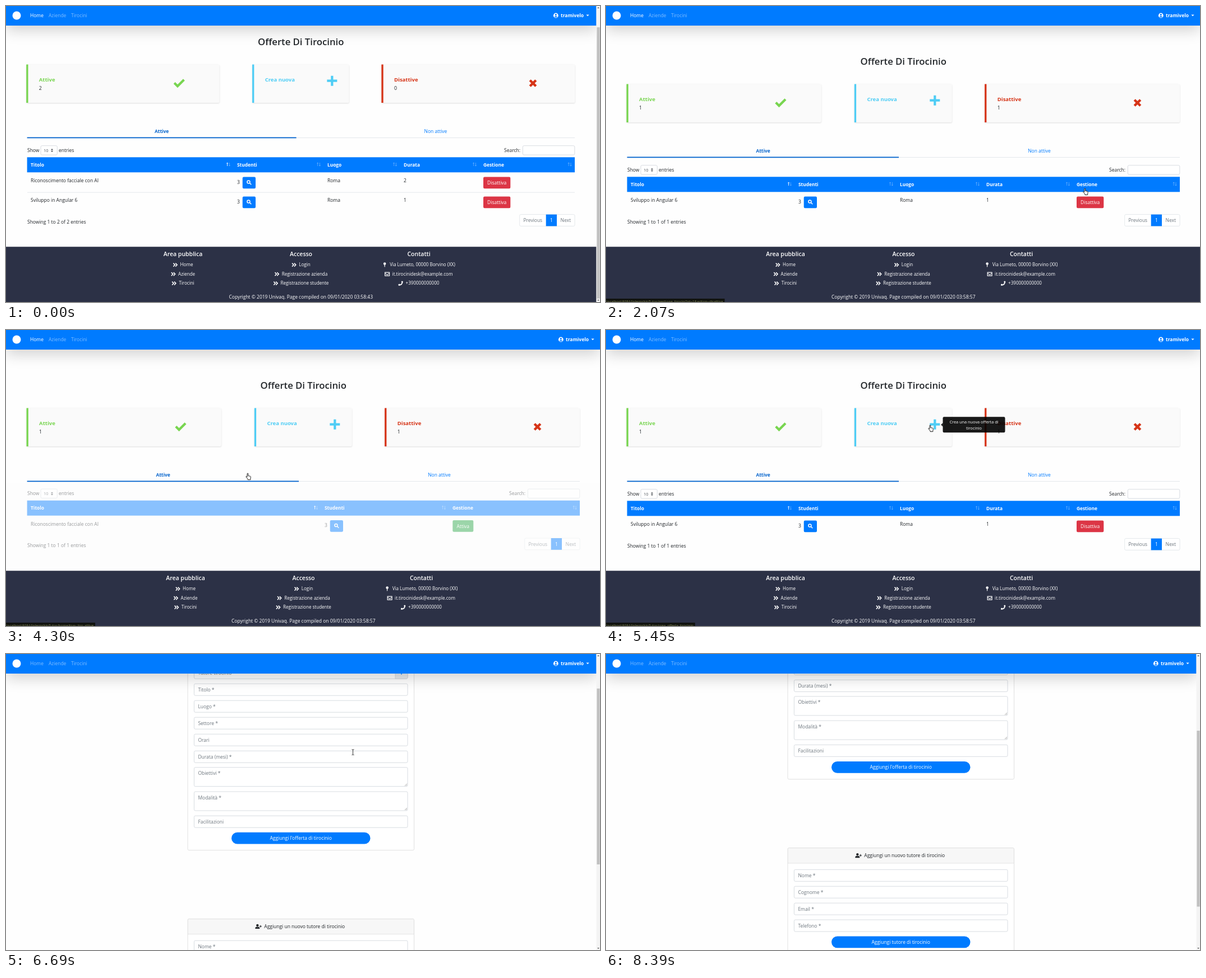
An HTML page with a canvas that plays this animation: 1059x529 px, repeating every 8640 ms.

```html
<!DOCTYPE html>
<html lang="it">
<head>
<meta charset="utf-8">
<title>Offerte di tirocinio</title>
<style>
  html, body { margin: 0; width: 100%; height: 100%; overflow: hidden; background: #fefefe; }
  canvas { display: block; }
</style>
</head>
<body>
<canvas id="stage" width="1059" height="529"></canvas>
<script>
const ctx = document.getElementById('stage').getContext('2d');
const LOOP = 8640, STAGE_W = 1059, STAGE_H = 529, NARROW_W = 1050;
const RELOAD = 1750, TO_INACTIVE = 2840, TO_ACTIVE = 4220, FADE = 150, FORM = 5620;
const BLUE = '#007bff', INK = '#212529', MUTED = '#6c757d', LINE = '#dee2e6';
const GREEN = '#78d550', CYAN = '#4fcdf5', RED = '#d63417', DANGER = '#dc3545';
const FONTS = '"Open Sans", "Noto Sans", sans-serif';
const BODY = 8.47, SMALL = 8.05;

// ---------- helpers ----------
const clamp = v => Math.max(0, Math.min(1, v));

function track(keys, t) {
  const i = keys.findIndex(k => k[0] > t);
  if (i < 0) return keys[keys.length - 1].slice(1);
  if (i === 0) return keys[0].slice(1);
  const a = keys[i - 1], b = keys[i], f = (t - a[0]) / (b[0] - a[0]);
  return a.slice(1).map((v, n) => v + (b[n + 1] - v) * f);
}

// y is the middle of the capitals
function text(str, x, y, { color = INK, size = BODY, weight = 400, align = 'left' } = {}) {
  ctx.font = `${weight} ${size}px ${FONTS}`;
  ctx.textAlign = align;
  ctx.fillStyle = color;
  ctx.fillText(str, x, y + size * 0.36);
}

function textWidth(str, size) {
  ctx.font = `400 ${size}px ${FONTS}`;
  return ctx.measureText(str).width;
}

function box(x, y, w, h, fill, stroke, radius = 2.2) {
  ctx.beginPath();
  ctx.roundRect(x, y, w, h, radius);
  if (fill) { ctx.fillStyle = fill; ctx.fill(); }
  if (stroke) { ctx.strokeStyle = stroke; ctx.lineWidth = 0.8; ctx.stroke(); }
}

function rect(x, y, w, h, fill) {
  ctx.fillStyle = fill;
  ctx.fillRect(x, y, w, h);
}

function path(d, x, y, { fill, stroke, width = 1 } = {}) {
  const p = new Path2D(d);
  ctx.save();
  ctx.translate(x, y);
  if (fill) { ctx.fillStyle = fill; ctx.fill(p); }
  if (stroke) { ctx.strokeStyle = stroke; ctx.lineWidth = width; ctx.stroke(p); }
  ctx.restore();
}

function withShadow(color, dy, blur, draw) {
  ctx.save();
  ctx.shadowColor = color;
  ctx.shadowOffsetY = dy;
  ctx.shadowBlur = blur;
  draw();
  ctx.restore();
}

const icons = {
  link: (x, y) => path('M-3.3-3L-.3 0L-3.3 3M.5-3L3.5 0L.5 3', x, y, { stroke: '#fff', width: 1.5 }),
  pin: (x, y) => path('M-2.3-2a2.3 2.3 0 1 1 4.6 0a2.3 2.3 0 0 1-1.7 2.2V3L0 4.5L-.6 3V.2A2.3 2.3 0 0 1-2.3-2z', x, y, { fill: '#fff' }),
  mail: (x, y) => path('M-4-3H4V3H-4zM-4-1.5L0 1.3L4-1.5', x, y, { stroke: '#fff', width: 1.1 }),
  phone: (x, y) => path('M2-4.2L4.2-3.6Q4 4-3.6 4.3L-4.2 2L-2 1L-1 2.1Q1.4 1 2.1-1L1-2z', x, y, { fill: '#fff' }),
};

// ---------- shared page parts ----------
function navbar(W, homeActive) {
  const edge = W < STAGE_W ? 1052.5 : STAGE_W;
  withShadow('rgba(0,0,0,.175)', 8.8, 26, () => rect(0, 0, edge, 35, BLUE));
  ctx.beginPath();
  ctx.arc(19, 17, 7.5, 0, 7);
  ctx.fillStyle = '#fff';
  ctx.fill();
  const dim = 'rgba(255,255,255,.5)';
  text('Home', 43, 17, { color: homeActive ? '#fff' : dim });
  text('Aziende', 76, 17, { color: dim });
  text('Tirocini', 116, 17, { color: dim });
  path('M-4.4 0a4.4 4.4 0 1 0 8.8 0a4.4 4.4 0 1 0-8.8 0z', W - 69.7, 17, { fill: '#fff' });
  path('M-1.6-1.3a1.6 1.6 0 1 0 3.2 0a1.6 1.6 0 1 0-3.2 0zM-2.8 2.6Q0-.4 2.8 2.6Q0 4.4-2.8 2.6z', W - 69.7, 17, { fill: BLUE });
  text('tramivelo', W - 61, 17, { color: '#fff', weight: 700 });
  path('M-2.6-1.3H2.6L0 1.4z', W - 13, 16.8, { fill: '#fff' });
}

function scrollbar(scroll, pageHeight) {
  const ratio = 517 / pageHeight;
  rect(1052.5, 0, 6.5, STAGE_H, '#f4f4f4');
  rect(1053.4, 6 + scroll * ratio, 5.2, STAGE_H * ratio, '#c1c1c1');
  path('M-1.8 1L0-1L1.8 1z', 1056, 3, { fill: '#505050' });
  path('M-1.8-1L0 1L1.8-1z', 1056, 526, { fill: '#505050' });
}

const footerColumns = [
  ['Area pubblica', -209.5, [['link', 'Home'], ['link', 'Aziende'], ['link', 'Tirocini']]],
  ['Accesso', 1, [['link', 'Login'], ['link', 'Registrazione azienda'], ['link', 'Registrazione studente']]],
  ['Contatti', 211, [['pin', 'Via Lumeto, 00000 Borvino (XX)'], ['mail', 'it.tirocinidesk@example.com'], ['phone', '+390000000000']]],
];

function footer(W, y, clock) {
  const mid = W / 2;
  rect(0, y, W < STAGE_W ? 1052.5 : W, 100, '#2c3146');
  for (const [title, dx, items] of footerColumns) {
    text(title, mid + dx, y + 13.2, { color: '#fff', size: 10.5, weight: 600, align: 'center' });
    items.forEach(([icon, label], i) => {
      const rowY = y + 32.3 + i * 16.5;
      const x = mid + dx - (13 + textWidth(label, SMALL)) / 2;
      icons[icon](x + 4, rowY);
      text(label, x + 13, rowY, { color: '#fff', size: SMALL });
    });
  }
  text(`Copyright © 2019 Univaq. Page compiled on 09/01/2020 03:58:${clock}`, mid + 0.7, y + 89.2,
    { color: '#fff', align: 'center' });
}

// ---------- offers page ----------
function offerCard(x, w, color, title, count) {
  withShadow('rgba(0,0,0,.13)', 1.1, 2.6, () => box(x, 139.5, w, 68.5, '#fafafa'));
  rect(x, 139.5, 3.3, 68.5, color);
  text(title, x + 22.6, 166.5, { color, size: 9.5, weight: 700 });
  if (count !== undefined) text(count, x + 22.6, 181.5, { size: 8.8 });
}

function sortArrows(x, y, sorted) {
  const style = a => ({ stroke: `rgba(255,255,255,${a})`, width: 0.9 });
  path('M0 3V-3M-1.3-1.5L0-3L1.3-1.5', x - 1.8, y, style(sorted ? 1 : 0.35));
  path('M0-3V3M-1.3 1.5L0 3L1.3 1.5', x + 2, y, style(0.35));
}

function button(x, y, w, label, color) {
  box(x, y, w, 20.8, color);
  text(label, x + w / 2, y + 10.7, { color: '#fff', align: 'center' });
}

// columns: [title, x]; rows: objects keyed by column title
function offersTable(W, columns, rows, hover) {
  const right = W - 36;
  text('Show', 38, 293);
  box(62, 284.7, 29.3, 16.4, '#fff', '#ced4da');
  text('10', 67, 293.2, { color: '#495057', size: 7.4 });
  path('M-2-.7L0-3L2-.7zM-2 .7L0 3L2 .7z', 82, 293, { fill: '#343a40' });
  text('entries', 94, 293);
  text('Search:', W - 133, 293, { align: 'right' });
  box(W - 128.7, 284.7, 92.5, 16.4, '#fff', '#ced4da');

  rect(37.6, 305.3, right - 37.6, 27, BLUE);
  columns.forEach(([title, x], i) => {
    text(title, x, 319, { color: '#fff', size: 8.35, weight: 700 });
    sortArrows(i + 1 < columns.length ? columns[i + 1][1] - 15.6 : W - 45, 318, i === 0);
  });

  rows.forEach((row, i) => {
    const y = 332 + i * 35;
    if (hover.row === i) rect(38, y, right - 38, 35, '#ececec');
    if (i) rect(38, y + 0.7, right - 38, 0.8, LINE);
    for (const [title, x] of columns) {
      if (title === 'Studenti') {
        text('3', x, y + 18);
        box(x + 9.7, y + 8.5, 23.3, 20.8, BLUE);
        path('M-3.4-1a2.5 2.5 0 1 0 5 0a2.5 2.5 0 1 0-5 0zM1 .8L4 3.8', x + 21.3, y + 18.5, { stroke: '#fff', width: 1.5 });
      } else if (title === 'Gestione') {
        if (row.off) button(x + 0.3, y + 8.5, 37, 'Attiva', '#28a745');
        else button(x, y + 8.5, 48.3, 'Disattiva', hover.button && i === 0 ? '#c82333' : DANGER);
      } else text(row[title], x, y + 15.3);
    }
  });

  const y = 350.8 + rows.length * 35, top = y - 13.2;
  text(`Showing 1 to ${rows.length} of ${rows.length} entries`, 38, y);
  box(W - 134.3, top, 98.3, 20.8, '#fff', LINE);
  rect(W - 87.3, top, 19.3, 20.8, BLUE);
  text('Previous', W - 110.7, y - 2.5, { color: MUTED, align: 'center' });
  text('1', W - 77.7, y - 2.5, { color: '#fff', align: 'center' });
  text('Next', W - 52.3, y - 2.5, { color: MUTED, align: 'center' });
}

const cols = (...xs) => ['Titolo', 'Studenti', 'Luogo', 'Durata', 'Gestione'].map((c, i) => [c, xs[i]]);
const FACES = { Titolo: 'Riconoscimento facciale con AI', Luogo: 'Roma', Durata: '2' };
const ANGULAR = { Titolo: 'Sviluppo in Angular 6', Luogo: 'Roma', Durata: '1' };
const tables = {
  both: [cols(44, 412, 573, 709, 851), [FACES, ANGULAR]],
  active: [cols(44, 343, 524, 678, 839), [ANGULAR]],
  inactive: [[['Titolo', 44], ['Studenti', 568], ['Gestione', 796]], [{ ...FACES, off: true }]],
};

function tabs(W, k, inactiveOpen) {
  const split = 522 * k, right = W - 36;
  rect(38, 270.2, right - 38, 0.8, LINE);
  if (inactiveOpen) rect(520, 269.3, right - 520, 1.8, '#0062cc');
  else rect(37.6, 269.5, split - 37.6, 1.8, '#0062cc');
  [['Attive', 280, !inactiveOpen], ['Non attive', 772.5, inactiveOpen]].forEach(([label, x, on]) =>
    text(label, x * k, 259, { color: on ? '#0062cc' : BLUE, weight: on ? 700 : 400, size: on ? 8.35 : BODY, align: 'center' }));
}

function tooltip(alpha) {
  if (!alpha) return;
  ctx.globalAlpha = alpha * 0.9;
  box(600.5, 155.3, 111, 28, '#000');
  path('M0 0L3.4-3.4V3.4z', 597.2, 169.3, { fill: '#000' });
  ctx.globalAlpha = alpha;
  text('Crea una nuova offerta di', 656, 164, { color: '#fff', size: 7.35, align: 'center' });
  text('tirocinio', 656, 175.5, { color: '#fff', size: 7.35, align: 'center' });
  ctx.globalAlpha = 1;
}

function offersPage(t) {
  const reloaded = t >= RELOAD;
  const W = reloaded ? STAGE_W : NARROW_W, k = W / STAGE_W, scroll = reloaded ? 0 : 35;
  const inactiveOpen = t >= TO_INACTIVE && t < TO_ACTIVE;

  ctx.save();
  ctx.translate(0, -scroll);
  text('Offerte Di Tirocinio', W / 2 + 0.7, 99, { size: 16.7, weight: 600, align: 'center' });
  offerCard(36.5 * k, 347.3 * k, GREEN, 'Attive', reloaded ? 1 : 2);
  offerCard(442.8 * k, 174 * k, CYAN, 'Crea nuova');
  offerCard(675.1 * k, 347.9 * k, RED, 'Disattive', reloaded ? 1 : 0);
  path('M-8.5 0L-2.8 5.7L8.7-5.8', 311.3 * k, 172.6, { stroke: GREEN, width: 4.2 });
  path('M-9 0H9M0-9V9', 586.3 * k, 168.7, { stroke: CYAN, width: 4.2 });
  path('M-5.3-5.3L5.3 5.3M5.3-5.3L-5.3 5.3', 947.5 * k, 173, { stroke: RED, width: 4.4 });
  tabs(W, k, inactiveOpen);

  // the old pane fades out, then the new one fades in
  const click = t >= TO_ACTIVE ? TO_ACTIVE : TO_INACTIVE;
  const phase = (t - click) / FADE;
  const alpha = phase < 0 || phase > 2 ? 1 : Math.abs(1 - phase);
  const showInactive = t >= TO_INACTIVE + FADE && t < TO_ACTIVE + FADE;
  const [columns, rows] = tables[!reloaded ? 'both' : showInactive ? 'inactive' : 'active'];
  const hover = { row: -1, button: t >= 1200 && !reloaded };
  if (t > 290 && !reloaded) {
    const y = track(cursorPath, t)[1] - 5 + scroll;
    hover.row = Math.floor((y - 332) / 35);
  }
  ctx.save();
  if (alpha < 1) ctx.translate(0, -0.6);
  offersTable(W, columns, rows, hover);
  ctx.restore();
  // veil the pane as one group, so white labels stay white
  if (alpha < 1) rect(0, 273, W, 150, `rgba(254,254,254,${1 - alpha})`);

  footer(W, 395.3 + rows.length * 35, reloaded ? 57 : 43);
  ctx.restore();
  navbar(W, true);
  if (!reloaded) scrollbar(scroll, 564);
  tooltip(clamp((t - 4900) / 150));
}

// ---------- form page ----------
function field(label, y, h = 21) {
  box(335.4, y - 10.5, 380.6, h, '#fff', '#ced4da');
  text(label, 342.4, y, { color: MUTED });
  if (h > 21) path('M0-4L-4 0M0-1.8L-1.8 0', 715, y + h - 11.5, { stroke: '#777', width: 0.6 });
}

function formCard(title, top, bottom, iconPath, titleX) {
  box(324, top, 403.5, bottom - top, '#fff');
  box(324, top, 403.5, 27.5, '#f7f7f7', null, [2.2, 2.2, 0, 0]);
  rect(324, top + 27, 403.5, 0.8, '#dfdfdf');
  box(324, top, 403.5, bottom - top, null, '#d9d9d9');
  path(iconPath, titleX - 10, top + 13.7, { fill: INK });
  text(title, titleX, top + 13.9);
}

function pill(label, y) {
  box(402, y - 10.4, 247.5, 20.8, BLUE, null, 10.4);
  text(label, 525.6, y, { color: '#fff', align: 'center' });
}

function formPage(t) {
  const scroll = track([[6400, 0], [6690, 93.4], [7080, 220.6]], t)[0];
  ctx.save();
  ctx.translate(0, 93.4 - scroll);
  formCard('Aggiungi una nuova offerta di tirocinio', -15, 351, 'M-5-2.5H-2V-4H2V-2.5H5V4H-5zM-1-2.5H1V-3H-1z', 456);
  field('Tutore tirocinio', 34);
  box(694, 23.5, 22, 21, '#e9ecef', '#ced4da', [0, 2.2, 2.2, 0]);
  path('M-3 0H3M0-3V3', 705, 34, { stroke: BLUE, width: 1.4 });
  ['Titolo *', 'Luogo *', 'Settore *', 'Orari', 'Durata (mesi) *'].forEach((label, i) => field(label, 64 + i * 30));
  field('Obiettivi *', 213.5, 34);
  field('Modalità *', 256.8, 34);
  field('Facilitazioni', 300);
  pill("Aggiungi l'offerta di tirocinio", 329.5);

  formCard('Aggiungi un nuovo tutore di tirocinio', 473.7, 663,
    'M-4.2-2a2.2 2.2 0 1 1 4.4 0a2.2 2.2 0 1 1-4.4 0zM-6 4V2.6Q-5.6.7-4 .7H0Q1.6.7 2 2.6V4zM3-.8V-2.4H4V-.8H5.6V.2H4V1.8H3V.2H1.4V-.8z', 460.3);
  ['Nome *', 'Cognome *', 'Email *', 'Telefono *'].forEach((label, i) => field(label, 523 + i * 29.9));
  pill('Aggiungi tutore di tirocinio', 642);
  ctx.restore();
  navbar(NARROW_W, false);
  scrollbar(scroll, 870);
}

// ---------- pointer and status bubble ----------
const cursorPath = [
  [210, 640, 540], [500, 780, 420], [800, 890, 290], [1060, 846, 322], [1140, 846, 322], [1370, 857, 325],
  [1750, 857, 325], [2070, 855, 332], [2610, 800, 282], [2820, 782, 266],
  [3610, 782, 266], [3850, 620, 234], [4150, 432, 262],
  [4530, 432, 262], [4850, 579, 176], [5770, 579, 176], [6100, 618, 175],
  [7630, 618, 175], [7800, 668, 200], [8030, 532, 340], [8200, 760, 470], [8390, 1068, 535],
];
// [from, shape]
const cursorShapes = [
  [290, 'arrow'], [1180, 'hand'], [2300, 'arrow'], [2740, 'hand'], [3650, 'arrow'], [4060, 'hand'],
  [4560, 'arrow'], [4780, 'hand'], [5700, 'arrow'], [6000, 'beam'], [7720, 'arrow'], [8390, null],
];
const shapes = {
  hand: 'M-2-5a.9.9 0 0 1 1.8 0v3.6l3.6.7q1 .3.9 1.4l-.5 3.3v1.6h-4.8v-1.4l-3-3.6q-.5-1 .5-1.2l1.5 1.2z',
  arrow: 'M-3-5.5V4L-.8 2L.7 5.4L2.2 4.7L.8 1.4H3.8z',
};

function cursor(t) {
  const current = cursorShapes.filter(([from]) => t >= from).pop();
  if (!current || !current[1]) return;
  const [x, y] = track(cursorPath, t);
  if (current[1] === 'beam') path('M-2-4.8H-.6L0-4.4L.6-4.8H2M0-4.4V4.4M-2 4.8H-.6L0 4.4L.6 4.8H2', x + 0.5, y + 0.5, { stroke: '#222', width: 0.9 });
  else path(shapes[current[1]], x, y, { fill: '#fff', stroke: '#111', width: 0.9 });
}

const statuses = [
  [1520, 2300, 'gestione_tirocini?ot=1&action=disattiva'],
  [2740, 4060, 'home#nav-tirp-nonattive'],
  [4060, 4560, 'home#nav-tirp-attive'],
  [4780, 5770, 'crea_offerta_tirocinio'],
];

function statusBubble(t) {
  const status = statuses.find(([from, to]) => t >= from && t < to);
  if (!status) return;
  const url = 'localhost:8084/InternshipTutor/' + status[2];
  rect(0, 523, textWidth(url, 6.3) + 4, 6, '#11130f');
  text(url, 1, 528.7, { color: '#7c8050', size: 6.3 });
}

function frame(now) {
  const t = now % LOOP;
  rect(0, 0, STAGE_W, STAGE_H, '#fefefe');
  if (t < FORM) offersPage(t);
  else formPage(t);
  statusBubble(t);
  cursor(t);
  requestAnimationFrame(frame);
}
requestAnimationFrame(frame);
</script>
</body>
</html>
```
